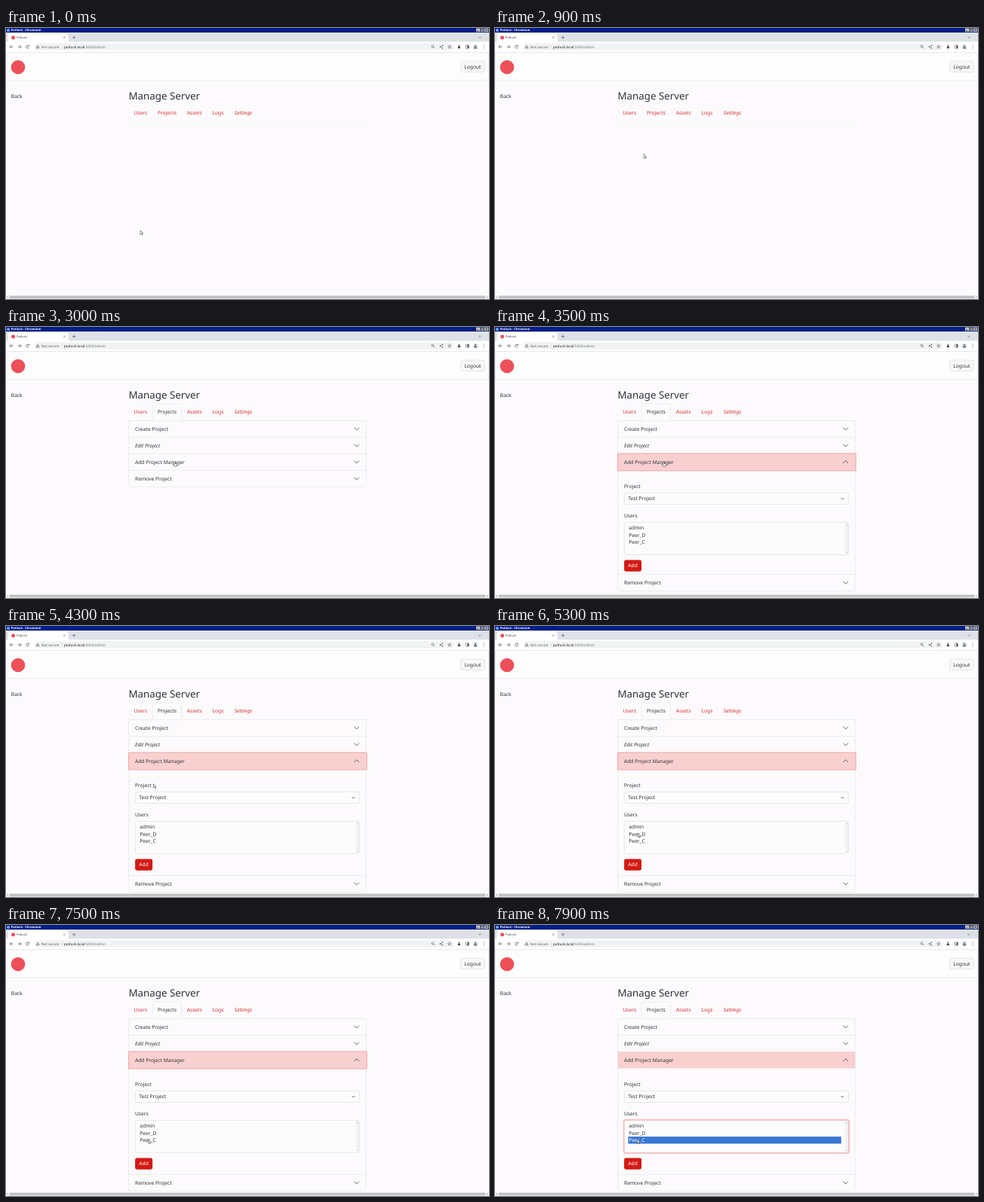
These frames come from a looping animation (640 by 360 pixels, 8 s). An HTML page with a canvas:

```html
<!DOCTYPE html>
<html lang="en">
<head>
<meta charset="utf-8">
<title>Manage Server</title>
<style>
html, body { margin: 0; width: 100%; height: 100%; overflow: hidden; background: #fcfafc; }
canvas { display: block; width: 640px; height: 360px; }
</style>
</head>
<body>
<canvas id="stage"></canvas>
<script>
const LOOP = 8000;
const FONT = '"Noto Sans", "Open Sans", sans-serif';
const PAGE = '#fcfafc', INK = '#303438', RED = '#d32f35', LINE = '#dcdce1';
const canvas = document.getElementById('stage');
const dpr = window.devicePixelRatio || 1;
canvas.width = 640 * dpr;
canvas.height = 360 * dpr;
const c = canvas.getContext('2d');
c.scale(dpr, dpr);
if ('textRendering' in c) c.textRendering = 'geometricPrecision';

// Timing of the interactions
const TAB_CLICK = 1250, OPEN_CLICK = 3213, PICK = 7620;

const clamp = v => Math.max(0, Math.min(1, v));
const span = (t, start, length) => clamp((t - start) / length);
const mix = (a, b, k) => a + (b - a) * k;
const smooth = k => k * k * (3 - 2 * k);

// cubic-bezier(.25, .1, .25, 1)
function ease(x) {
  let lo = 0, hi = 1, s = x;
  for (let i = 0; i < 24; i++) {
    s = (lo + hi) / 2;
    const bx = 0.75 * s * (1 - s) + s * s * s;
    if (bx < x) lo = s; else hi = s;
  }
  return 0.3 * s * (1 - s) ** 2 + 3 * s * s * (1 - s) + s ** 3;
}

// Pointer stops: time, x, y
const stops = [
  [100, 178, 269], [300, 178, 266], [400, 178, 266], [1230, 207.3, 115.2],
  [1900, 207.3, 115.2], [2800, 224, 178.6], [2850, 224, 178.6], [3000, 223.6, 179.2],
  [4000, 223.6, 179.2], [4600, 167.5, 240], [4700, 167.5, 240], [5300, 189.2, 275.2],
  [5800, 189.2, 275.2], [6300, 188.7, 282], [7420, 188.7, 282], [7500, 188.5, 284.8]
];

function pointerAt(t) {
  const i = stops.findIndex(s => s[0] > t);
  if (i === 0) return stops[0].slice(1);
  if (i < 0) return stops[stops.length - 1].slice(1);
  const a = stops[i - 1], b = stops[i];
  const k = smooth(span(t, a[0], b[0] - a[0]));
  return [mix(a[1], b[1], k), mix(a[2], b[2], k)];
}

function text(str, x, y, size = 6.667, color = INK, style = '') {
  c.font = `${style} ${size}px ${FONT}`;
  c.fillStyle = color;
  c.fillText(str, x, y);
}

function rect(x, y, w, h, color) {
  c.fillStyle = color;
  c.fillRect(x, y, w, h);
}

function box(x, y, w, h, r, fill, stroke, width = 0.5) {
  c.beginPath();
  c.roundRect(x, y, w, h, r);
  if (fill) { c.fillStyle = fill; c.fill(); }
  if (stroke) { c.strokeStyle = stroke; c.lineWidth = width; c.stroke(); }
}

function path(points, color, width = 0.7, close = false, fill = null) {
  c.beginPath();
  for (let i = 0; i < points.length; i += 2) c.lineTo(points[i], points[i + 1]);
  if (close) c.closePath();
  if (fill) { c.fillStyle = fill; c.fill(); }
  if (color) { c.strokeStyle = color; c.lineWidth = width; c.stroke(); }
}

function disc(x, y, r, fill, stroke, width = 0.6) {
  c.beginPath();
  c.arc(x, y, r, 0, Math.PI * 2);
  if (fill) { c.fillStyle = fill; c.fill(); }
  if (stroke) { c.strokeStyle = stroke; c.lineWidth = width; c.stroke(); }
}

function at(x, y, draw, turn = 0) {
  c.save();
  c.translate(x, y);
  c.rotate(turn);
  draw();
  c.restore();
}

function titleBar() {
  rect(0, 0, 640, 6, '#001e87');
  disc(3, 2.9, 2, '#6fa8ee');
  text('Potluck - Chromium', 6.8, 4.4, 4, '#fff', 'bold');
  [623, 628.6, 634.3].forEach((x, i) => {
    rect(x, 0.5, 5, 4.6, '#c6c5c3');
    if (i === 0) rect(x + 1, 3.6, 2.4, 0.7, '#111');
    if (i === 1) c.strokeStyle = '#111', c.lineWidth = 0.6, c.strokeRect(x + 1.1, 1.3, 2.7, 2.7);
    if (i === 2) {
      path([x + 1.2, 1.4, x + 3.8, 4.1], '#111');
      path([x + 3.8, 1.4, x + 1.2, 4.1], '#111');
    }
  });
}

function browser() {
  const dark = '#4a4d51';
  titleBar();
  rect(0, 6, 640, 12.6, '#dee1e6');
  box(2.7, 7.4, 80, 13, 2.6, '#fff');
  rect(0, 18.4, 640, 13.8, '#fff');
  disc(9.6, 12.7, 2.5, '#ee5059');
  text('Potluck', 14, 14.1, 4, '#3c4043');
  path([76, 11.3, 78.5, 13.8], dark, 0.5);
  path([78.5, 11.3, 76, 13.8], dark, 0.5);
  path([87.9, 12.6, 92.1, 12.6], dark, 0.6);
  path([90, 10.5, 90, 14.7], dark, 0.6);
  path([626.2, 11.6, 628, 13.4, 629.8, 11.6], dark, 0.6);

  path([9.6, 25, 5.2, 25], dark);
  path([7.2, 22.9, 5.1, 25, 7.2, 27.1], dark);
  path([15.6, 25, 20, 25], dark);
  path([18, 22.9, 20.1, 25, 18, 27.1], dark);
  c.beginPath();
  c.arc(28.6, 25, 1.9, 0.4, 5.6);
  c.strokeStyle = dark;
  c.lineWidth = 0.7;
  c.stroke();
  path([30.8, 22.6, 30.8, 24.6, 28.8, 24.6], null, 0, true, dark);

  box(37.6, 20.3, 556, 9.4, 4.7, '#f1f3f4');
  path([42, 23, 44.1, 26.7, 39.9, 26.7], dark, 0.55, true);
  rect(41.75, 24.2, 0.5, 1.8, dark);
  text('Not secure', 46.8, 26.7, 4.667, '#5f6368');
  rect(74.2, 22.5, 0.4, 5, '#c5c8cc');
  text('potluck.local', 77, 26.7, 4.667, '#202124');
  const hostWidth = c.measureText('potluck.local').width;
  text(':5000/admin', 77 + hostWidth, 26.7, 4.667, '#73777b');

  disc(565.4, 24.4, 1.4, null, dark);
  path([566.4, 25.4, 568, 27], dark);
  path([578.4, 23.3, 575.4, 25, 578.4, 26.7], dark, 0.5);
  [[578.4, 23.3], [575.4, 25], [578.4, 26.7]].forEach(p => disc(p[0], p[1], 0.75, dark));
  const star = [];
  for (let i = 0; i < 10; i++) {
    const a = -Math.PI / 2 + i * Math.PI / 5, r = i % 2 ? 1 : 2.3;
    star.push(587.7 + r * Math.cos(a), 25.1 + r * Math.sin(a));
  }
  path(star, dark, 0.5, true);
  path([599.8, 22.6, 600.9, 22.6, 600.9, 24.2, 602.3, 27.1, 598.4, 27.1, 599.8, 24.2], null, 0, true, '#333');
  box(609.2, 23, 4, 4, 0.4, null, dark, 0.6);
  rect(611.4, 23, 1.8, 4, dark);
  disc(622, 25, 3.5, '#dfe3e9');
  disc(622, 24, 1.1, '#56606d');
  box(620, 25.5, 4, 1.8, 0.9, '#56606d');
  [23.1, 25, 26.9].forEach(y => disc(633, y, 0.5, dark));
  rect(0, 32, 640, 0.5, '#dcdee1');
}

function header() {
  rect(0, 32.5, 640, 37.2, '#fefdfe');
  box(0.3, 32.5, 639.4, 37.2, 0, null, LINE, 0.5);
  disc(16, 52, 9.3, '#ee5059');
  box(602.6, 44, 31.6, 14.6, 2.3, '#f8f8f9', '#d6d8db', 0.6);
  text('Logout', 607.3, 53.5);
  text('Back', 6.8, 93.3);
  text('Manage Server', 162.5, 95.2, 13.333);
}

function tabs(active) {
  rect(162.5, 124, 315, 0.5, active ? LINE : '#ececf0');
  if (active) {
    box(194.2, 102.2, 38.5, 24, 2.5, PAGE, LINE, 0.5);
    rect(193.5, 124.3, 40, 2.2, PAGE);
  }
  [['Users', 169.4], ['Projects', 200.9], ['Assets', 239.7], ['Logs', 273.6], ['Settings', 302.8]]
    .forEach(([name, x], i) => text(name, x, 115.4, 6.667,
      active && i === 1 ? INK : RED, i === 4 ? 'italic' : ''));
}

function chevron(x, y, size, turn = 0, color = INK) {
  at(x, y, () => path([-size, -size / 2, 0, size / 2, size, -size / 2], color, 0.75), turn);
}

function row(name, y, style) {
  text(name, 171, y + 2.4, 6.667, INK, style);
}

function form(t) {
  const focus = span(t, PICK, 150);
  text('Project', 171, 214.3);
  box(171.3, 220.4, 297.2, 15.1, 2.4, '#fdfcfd', '#d0d4d9', 0.5);
  text('Test Project', 176.2, 230.4);
  chevron(460.4, 228.1, 1.9);
  text('Users', 171, 253.4);

  if (focus) {
    c.globalAlpha *= focus;
    box(170.5, 258.7, 298.9, 44.5, 3, null, '#f5c8c8', 1.7);
    c.globalAlpha /= focus;
  }
  box(171.3, 259.5, 297.2, 42.9, 2.4, '#fdfcfd', focus ? '#e69a9b' : '#d0d4d9', 0.5);
  rect(463.6, 260.2, 4.4, 41.4, '#f3f3f4');
  path([465, 263.2, 466, 262, 467, 263.2], null, 0, true, '#999');
  path([465, 298.9, 466, 300.1, 467, 298.9], null, 0, true, '#999');
  const picked = t >= PICK;
  if (picked) rect(176.4, 281.1, 282.3, 9.4, '#3876d3');
  ['admin', 'Peer_D', 'Peer_C'].forEach((name, i) =>
    text(name, 177.3, 269.2 + i * 9.45, 6.667, picked && i === 2 ? '#fff' : INK));

  box(171.1, 309.4, 23, 15.3, 2.4, '#d31a14');
  text('Add', 176.3, 319.4, 6.667, '#fff');
}

function accordion(t) {
  const shown = span(t, TAB_CLICK, 180);
  if (!shown) return;
  const grow = 141 * ease(span(t, OPEN_CLICK, 350));
  const tint = span(t, OPEN_CLICK, 150);
  c.globalAlpha = shown;
  box(162.7, 124.3, 314.6, 88 + grow, [0, 0, 2.4, 2.4], PAGE, LINE, 0.5);
  [146.4, 168.4, 190.4 + grow].forEach(y => rect(162.5, y - 0.2, 315, 0.45, LINE));

  if (grow) {
    c.save();
    c.beginPath();
    c.rect(160, 190.6, 320, grow - 0.4);
    c.clip();
    form(t);
    c.restore();
  }
  if (tint) {
    c.globalAlpha = tint;
    rect(162.7, 168.4, 314.6, 22, '#f9d0d0');
    if (t < PICK) box(162.6, 168.1, 315.4, 22.8, 0.8, null, '#f0b0b1', 1.4);
    c.globalAlpha = 1;
  }
  row('Create Project', 135.1);
  row('Edit Project', 157.1, 'italic');
  row('Add Project Manager', 179.1);
  row('Remove Project', 201.1 + grow);
  chevron(464.6, 135.3, 3.3);
  chevron(464.6, 157.3, 3.3);
  chevron(464.6, 179.3, 3.3, -Math.PI * smooth(span(t, OPEN_CLICK, 200)));
  chevron(464.6, 201.3 + grow, 3.3);
  c.globalAlpha = 1;
}

function scrollBar() {
  rect(0, 355, 640, 5, '#f3f2f3');
  rect(5, 355.7, 630, 3.6, '#c1c1c2');
  path([3, 356.4, 1.7, 357.5, 3, 358.6], null, 0, true, '#777');
  path([637, 356.4, 638.3, 357.5, 637, 358.6], null, 0, true, '#777');
}

function statusBubble(t) {
  const alpha = span(t, 1150, 120) * (1 - span(t, 2350, 200));
  if (!alpha) return;
  c.globalAlpha = alpha;
  box(-1, 352.9, 69, 8, [0, 1.4, 0, 0], '#dee1e6', '#c6c9ce', 0.4);
  text('potluck.local:5000/admin#projects', 1.6, 357.8, 4, '#4d5156');
  c.globalAlpha = 1;
}

function pointer(t) {
  const [x, y] = pointerAt(t);
  const hand = y < (t < TAB_CLICK ? 124 : 191);
  at(x, y, () => {
    if (hand) {
      path([-0.6, 0.2, 0, -0.2, 0.6, 0.2, 0.7, 2.2, 2.6, 2.6, 3.1, 3.2, 2.6, 5.8,
        -0.8, 5.8, -2.3, 3.5, -1.9, 2.9, -0.7, 3.7], '#222', 0.55, true, '#fff');
    } else {
      path([0, 0, 0, 5.2, 1.2, 4.2, 2.1, 6.1, 3, 5.7, 2.1, 3.8, 3.8, 3.7],
        '#222', 0.5, true, '#fff');
    }
  });
}

function draw(t) {
  c.globalAlpha = 1;
  rect(0, 0, 640, 360, PAGE);
  browser();
  header();
  tabs(t >= TAB_CLICK);
  accordion(t);
  scrollBar();
  statusBubble(t);
  pointer(t);
}

const began = performance.now();
function tick() {
  draw((performance.now() - began) % LOOP);
  requestAnimationFrame(tick);
}
tick();
</script>
</body>
</html>
```
